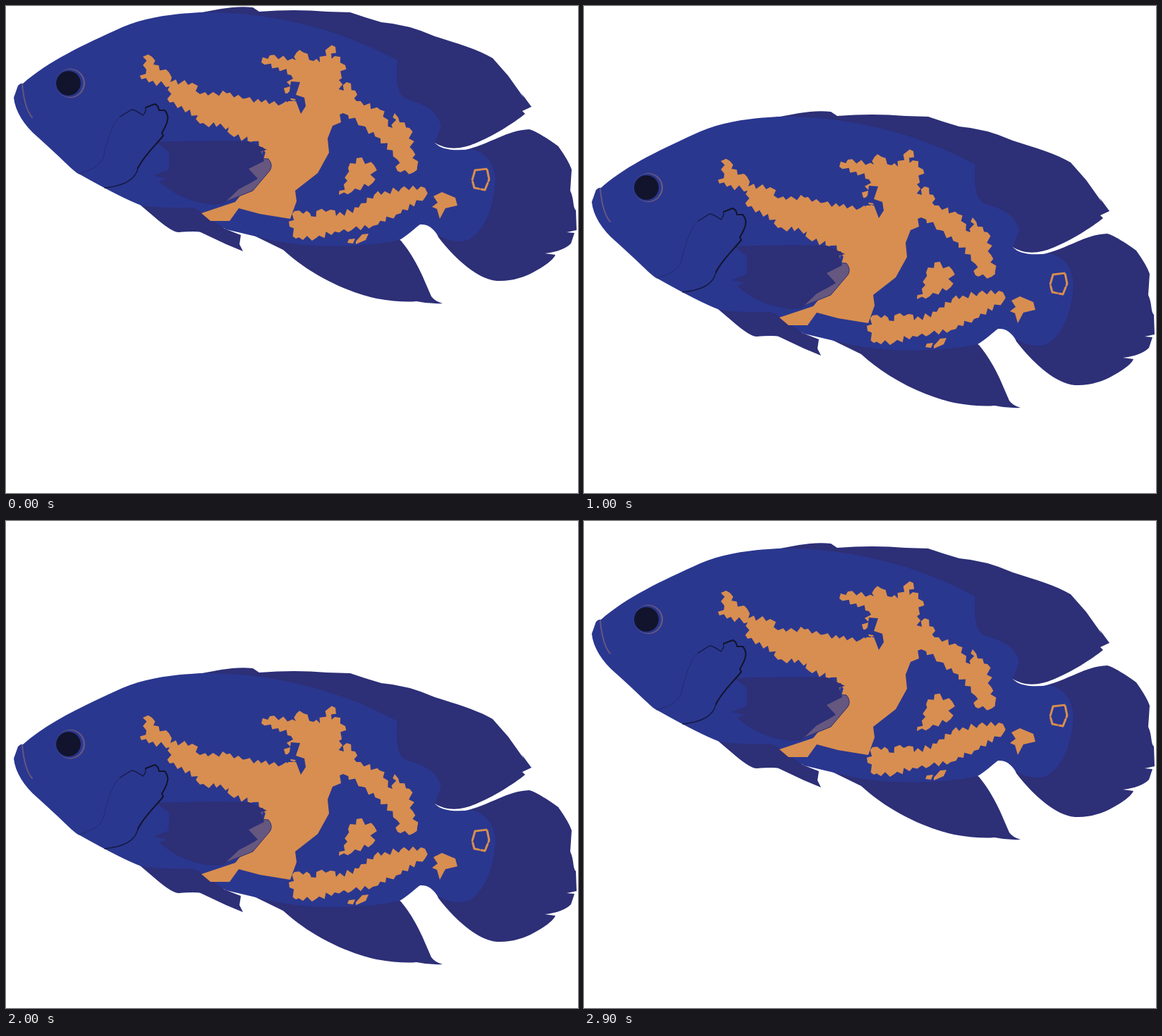
Write an HTML page that moves like this. It is 811 px wide and 691 px high and loops after 3.1 s.

```html
<!DOCTYPE html>
<html lang="en">
<head>
<meta charset="utf-8">
<title>Swimming fish</title>
<style>
  html, body { margin: 0; width: 100%; height: 100%; overflow: hidden; background: #fff; }
  svg { display: block; }
  .dark { fill: #2d2f77; }
  .body { fill: #2a378f; }
  .orange { fill: #d88e50; }
  .grey { fill: #65577f; }
  .line { fill: none; stroke-linejoin: round; stroke-linecap: round; }
</style>
</head>
<body>
<svg width="811" height="691" viewBox="0 0 811 691">
<g id="fish">
  <g class="dark">
    <path id="dorsal" d="M272 10C300 5 325-1 350 2L359 8Q410 4 455 8L488 9 509 16 532 23Q570 26 608 43C640 53 670 62 690 74L712 99 734 130 731 124 745 143 732 149 736 153C720 166 690 185 665 195C648 202 627 206 608 194L540 150Z"/>
    <path id="tail" d="M645 206C690 195 710 176 742 175Q752 177 783 199Q798 220 802 232L800 262C806 275 803 285 808 290L809 318 795 321 806 322 801 337Q790 348 764 351L779 353Q776 362 749 377C730 388 700 395 680 386C655 376 630 350 613 328L605 310Z"/>
    <path id="anal" d="M350 325L393 346C430 380 480 405 525 415Q560 421 582 419Q600 423 619 422Q608 419 603 412L590 382C578 356 568 343 560 333L540 320Z"/>
    <path id="pelvic" d="M190 282L210 299Q235 321 245 321Q270 319 276 321L312 338 336 348 331 338 333 325 310 316 280 285Z"/>
  </g>
  <path class="body" d="M11 130L17 113Q21 109 24 110C60 78 110 55 165 30C200 15 240 11 275 9C370 7 470 31 555 77C552 105 555 127 568 132C590 140 610 145 617 170L608 194Q620 208 660 203C680 208 692 222 694 245C693 280 680 320 655 332Q635 338 612 325C605 315 598 309 587 310C580 315 570 325 558 332C500 344 430 343 380 333L312 317 278 294Q270 286 260 286Q220 287 192 283Q165 273 103 238C97 236 85 222 45 186C25 169 13 149 11 130Z"/>

  <g class="orange">
    <polygon id="shoulder" class="rough" points="192,104 199,90 194,72 207,72 209,83 231,94 233,108 264,109 275,125 313,124 340,131 391,139 430,135 430,180 385,215 364,200 350,192 318,182 316,172 275,167 272,155 232,137 232,114"/>
    <polygon id="branch" class="rough" points="362,80 374,70 411,77 412,66 422,66 436,78 445,80 456,60 467,58 457,82 466,71 481,84 472,105 476,124 478,150 400,160 411,134 396,124 404,98 386,87"/>
    <polygon id="back" class="rough" points="465,125 479,120 483,108 495,120 497,135 530,147 548,173 551,152 558,165 572,173 577,205 583,228 578,236 555,234 555,218 531,188 505,170 478,152 460,150"/>
    <polygon id="flank" points="400,135 470,135 475,165 463,170 456,188 458,208 442,237 410,262 412,277 403,302 360,295 330,287 317,305 290,305 277,294 325,278 360,235 370,200"/>
    <polygon id="spot" class="rough" points="497,216 522,226 520,251 490,264 472,268 484,248 485,230"/>
    <polygon id="belly" class="rough" points="409,291 431,294 430,306 440,291 460,289 468,298 500,286 522,268 560,259 594,258 594,272 553,296 520,312 490,318 466,320 440,329 411,330 402,313"/>
    <path d="M486 331L495 330 492 337 484 336ZM496 334L505 324 514 323 510 332 496 338Z"/>
    <polygon points="606,270 618,264 637,272 640,283 623,287 615,302 611,288 604,285 612,279"/>
  </g>
  <path class="line" stroke="#d88e50" stroke-width="3" stroke-dasharray="16 3" d="M665 233L682 231 685 246 679 261 664 258 661 247Z"/>
  <path class="body" d="M404 107L417 108 411 126 423 130 425 142 418 153 410 132 394 129 402 121Z"/>

  <!-- pectoral fin -->
  <path class="grey" stroke="#2d2f77" d="M340 215L372 217C378 224 377 231 372 236L350 262 313 277 300 281Z"/>
  <path class="grey" d="M354 205L366 204 362 211Z"/>
  <path class="dark" d="M213 193Q290 190 345 192L370 204 361 206 366 220 344 231 357 245 347 251 330 260 308 281C275 285 240 270 217 249L228 245 209 241 231 232 231 207Z"/>

  <!-- gill cover and mouth -->
  <g class="line">
    <path stroke="#222b70" d="M103 238C130 230 138 222 140 205C148 175 155 162 162 157"/>
    <path stroke="#151a42" stroke-width="1.4" d="M162 157L178 147Q183 147 194 155Q199 150 198 144M187 230C184 245 170 255 140 258"/>
    <path stroke="#11142c" stroke-width="2" d="M198 144L211 139Q216 141 217 148L225 148C231 155 232 162 221 180L223 184C210 200 195 213 187 230"/>
    <path stroke="#65577f" stroke-width="2" d="M23 111Q26 145 37 158"/>
  </g>
  <circle class="grey" cx="91.3" cy="109.6" r="20.8"/>
  <circle class="body" cx="90" cy="109.6" r="19.6"/>
  <circle cx="88.5" cy="109.6" r="17.4" fill="#11142c"/>
</g>
</svg>
<script>
  const fish = document.getElementById("fish");

  let seed = 7;
  const random = () => (seed = seed * 16807 % 2147483647) / 2147483647;

  // Breaks each long edge of an outline into small uneven teeth.
  function roughen(polygon) {
    const corners = [...polygon.points].map(p => [p.x, p.y]);
    const outline = corners.flatMap(([x, y], i) => {
      const [nextX, nextY] = corners[(i + 1) % corners.length];
      const dx = nextX - x, dy = nextY - y, length = Math.hypot(dx, dy);
      const count = Math.max(1, Math.round(length / 6));
      const points = [[x, y]];
      for (let j = 1; j < count; j++) {
        const along = (j + random() * 0.6 - 0.3) / count;
        const out = (j % 2 ? 1 : -1) * (1.5 + random() * 3) / length;
        points.push([x + dx * along + dy * out, y + dy * along - dx * out]);
      }
      return points;
    });
    polygon.setAttribute("points", outline.join(" "));
  }
  document.querySelectorAll(".rough").forEach(roughen);

  // Sinks in even steps, rises quickly at first, then at the sinking pace.
  function depth(t) {
    if (t < 1800) return Math.floor(t / 200);
    if (t < 2300) return 9 - Math.floor((t - 1800) / 100);
    return 4 - Math.floor((t - 2300) / 200);
  }

  function draw() {
    const y = Math.round(depth(performance.now() % 3100) * 29.6);
    fish.setAttribute("transform", `translate(0 ${y})`);
    requestAnimationFrame(draw);
  }
  draw();
</script>
</body>
</html>
```
